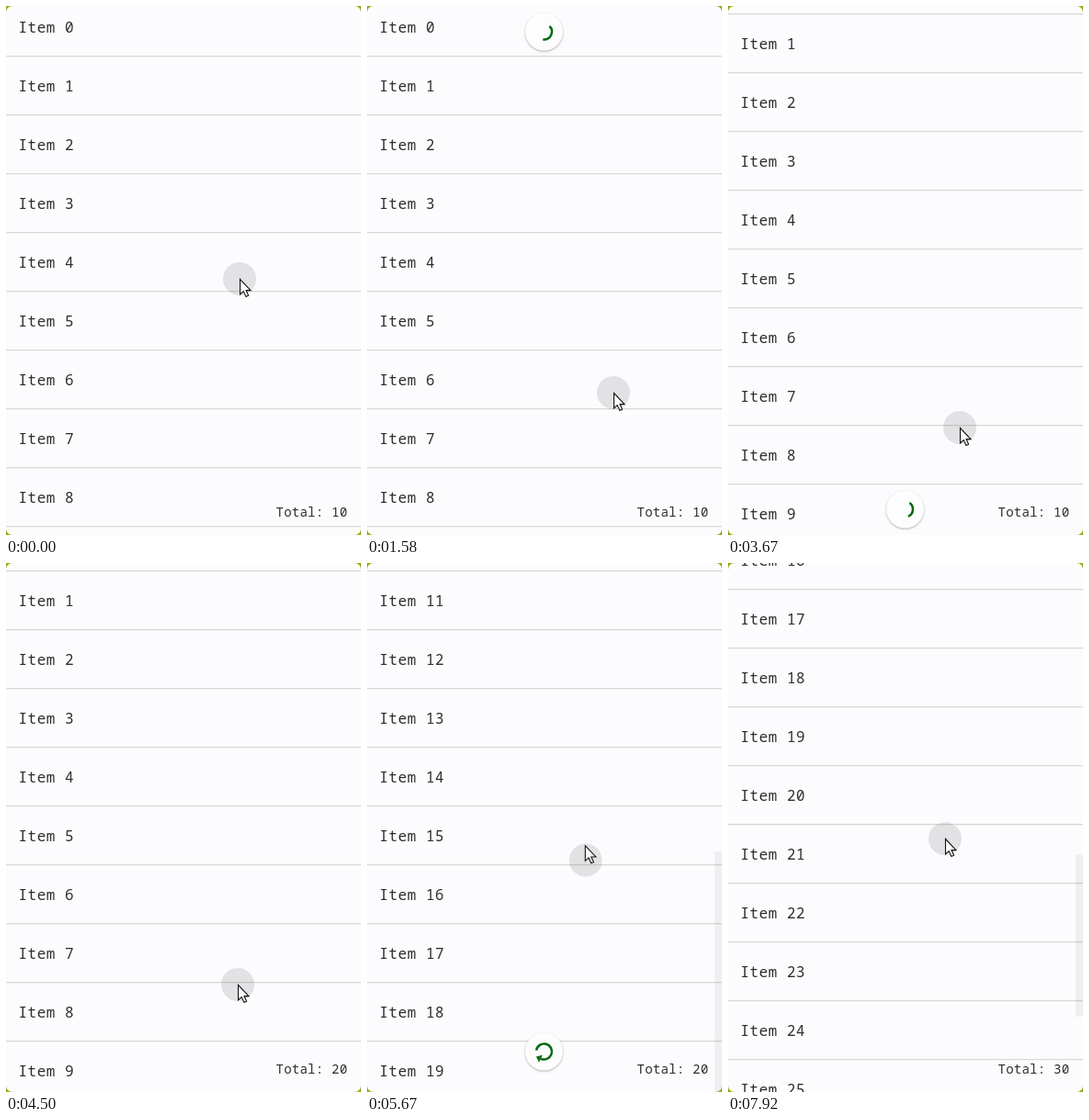
Animation, 386 px wide and 576 px high, one loop 8000 ms. Source, as an HTML page:

```html
<!DOCTYPE html>
<html lang="en">
<head>
<meta charset="utf-8">
<title>Refreshable list</title>
<style>
  html, body { margin: 0; width: 100%; height: 100%; overflow: hidden; background: #8db010; }
  #app {
    position: absolute; width: 386px; height: 576px; overflow: hidden;
    border-radius: 7px; background: #fcfcff; color: #2e2e2c;
    font-family: "Noto Sans Mono", monospace;
  }
  #list { position: absolute; top: -9px; width: 100%; }
  .row {
    box-sizing: border-box; height: 64px; padding-left: 13.5px;
    font-size: 16px; line-height: 64px; letter-spacing: .5px; position: relative;
  }
  .row::after {
    content: ""; position: absolute; left: 0; bottom: 0; width: 100%; height: 1px;
    background: #d9d9d6; box-shadow: 0 1px #f1f1f1;
  }
  #total {
    position: absolute; left: 293.5px; top: 541px;
    font-size: 14px; line-height: 20px; letter-spacing: .25px; white-space: pre;
  }
  #thumb { position: absolute; left: 378px; width: 8px; background: rgba(0, 0, 0, .05); }
  svg { position: absolute; left: 0; top: 0; }
  #disc { filter: drop-shadow(0 1px 1px rgba(0, 0, 0, .3)); }
</style>
</head>
<body>
<div id="app">
  <div id="list"></div>
  <div id="total"></div>
  <div id="thumb"></div>
  <svg width="386" height="576">
    <g id="badge">
      <circle id="disc" r="20.5" fill="#fdfdfd"/>
      <path id="arc" fill="none" stroke="#046a10" stroke-width="2.5"/>
      <path id="head" d="M4 0H13L8.5 5.5Z" fill="#046a10"/>
    </g>
    <circle id="halo" r="18" fill="rgba(0,0,0,.1)"/>
    <path id="pointer" d="M.5 .5V17L4.2 13.6L6.9 19.5L9.6 18.3L7 12.6H12Z" fill="#fff" stroke="#111" stroke-width="1.1"/>
  </svg>
</div>
<script>
const LOOP = 8000, FRAMES = 96, RAD = Math.PI / 180;
const $ = id => document.getElementById(id);
const clamp = (v, a = 0, b = 1) => Math.min(b, Math.max(a, v));
const part = (t, from, length) => clamp((t - from) / length);
const smooth = k => k * k * (3 - 2 * k);

// Pointer moves: start, end, x, y
const moves = [
  [80, 330, 221, 137], [500, 1000, 268, 421], [2200, 2850, 250, 250],
  [3300, 3640, 252, 459], [4600, 4900, 241, 311], [5100, 5380, 243, 420],
  [5380, 5880, 233, 238], [6400, 7000, 219, 452], [7510, 7900, 236, 300]
];
// Each gesture drags the list, pulls the badge in from an edge and lets it go
const gestures = [
  { drag: 500, pull: 500, release: 1000, edge: 0, dir: 1 },
  { drag: 2200, pull: 2400, release: 3130, edge: 576, dir: -1 },
  { drag: 4600, pull: 5380, release: 6030, edge: 576, dir: -1 },
  { drag: 7510, pull: Infinity, release: Infinity }
];
const SPIN = 300, DONE = 1150;

for (let i = 0; i < 30; i++) {
  const row = document.createElement("div");
  row.className = "row";
  row.textContent = "Item " + i;
  $("list").append(row);
}

function pointerAt(t) {
  let x = 254, y = 297;
  for (const [from, to, nx, ny] of moves) {
    const k = smooth(part(t, from, to - from));
    x += (nx - x) * k;
    y += (ny - y) * k;
  }
  return `translate(${x} ${y})`;
}

const fling = (t, from) => clamp((t - from) * 1.12, 0, 640);
const scrollAt = t => 46 * smooth(part(t, 2250, 230)) + fling(t, 4685) + fling(t, 7595);

function drawBadge(t) {
  const g = gestures.find(g => t >= g.pull && t < g.release + DONE + 200);
  $("badge").style.display = g ? "" : "none";
  if (!g) return;
  const pulled = Math.sin(part(t, g.pull, 500) * 90 * RAD);
  const off = -24 + 86 * pulled - 34 * smooth(part(t, g.release, 220));
  const s = t - g.release - SPIN, spinning = s >= 0;
  let from = 190 + (off - 44) * 4, sweep = 285 * clamp(pulled * 1.3);
  if (spinning) {
    const cycle = s / 1333 % 1;
    const grow = smooth(part(cycle, 0, .5) ** .75), shrink = smooth(part(cycle, .5, .5) ** .75);
    from = -110 + shrink * 270 + s / 2222 * 360 + cycle * 90;
    sweep = Math.max((grow - shrink) * 270, 3);
  }
  const point = deg => `${8.5 * Math.cos(deg * RAD)} ${8.5 * Math.sin(deg * RAD)}`;
  const to = from + sweep, size = 1 - part(t, g.release + DONE, 200);
  $("arc").setAttribute("d", `M${point(from)}A8.5 8.5 0 ${+(sweep > 180)} 1 ${point(to)}`);
  $("head").setAttribute("transform", `rotate(${to})`);
  $("head").style.display = spinning ? "none" : "";
  $("badge").setAttribute("transform", `translate(192.5 ${g.edge + g.dir * off}) scale(${size})`);
}

function draw(t) {
  const loads = gestures.filter(g => g.dir < 0 && t >= g.release + DONE).length;
  const total = 10 + 10 * loads, range = total * 64 - 594;
  const scroll = Math.min(scrollAt(t), range);
  $("list").style.transform = `translateY(${-Math.round(scroll)}px)`;
  $("total").textContent = "Total: " + total;

  const size = 580.6 * 574 / (574 + range);
  const shown = gestures.map(g => part(t, g.drag, 100) * (1 - part(t, g.release + SPIN, 190)));
  $("thumb").style.height = size + "px";
  $("thumb").style.top = -2.6 + scroll / range * (580.6 - size) + "px";
  $("thumb").style.opacity = Math.max(...shown);

  drawBadge(t);
  $("halo").setAttribute("transform", pointerAt(t - 30));
  $("pointer").setAttribute("transform", pointerAt(t));
}

// Time moves in steps of one twelfth of a second, rounded to 10 ms
function tick() {
  const step = Math.floor((performance.now() % LOOP + 5) * FRAMES / LOOP) % FRAMES;
  draw(Math.round(step * LOOP / FRAMES / 10) * 10);
  requestAnimationFrame(tick);
}
tick();
</script>
</body>
</html>
```
